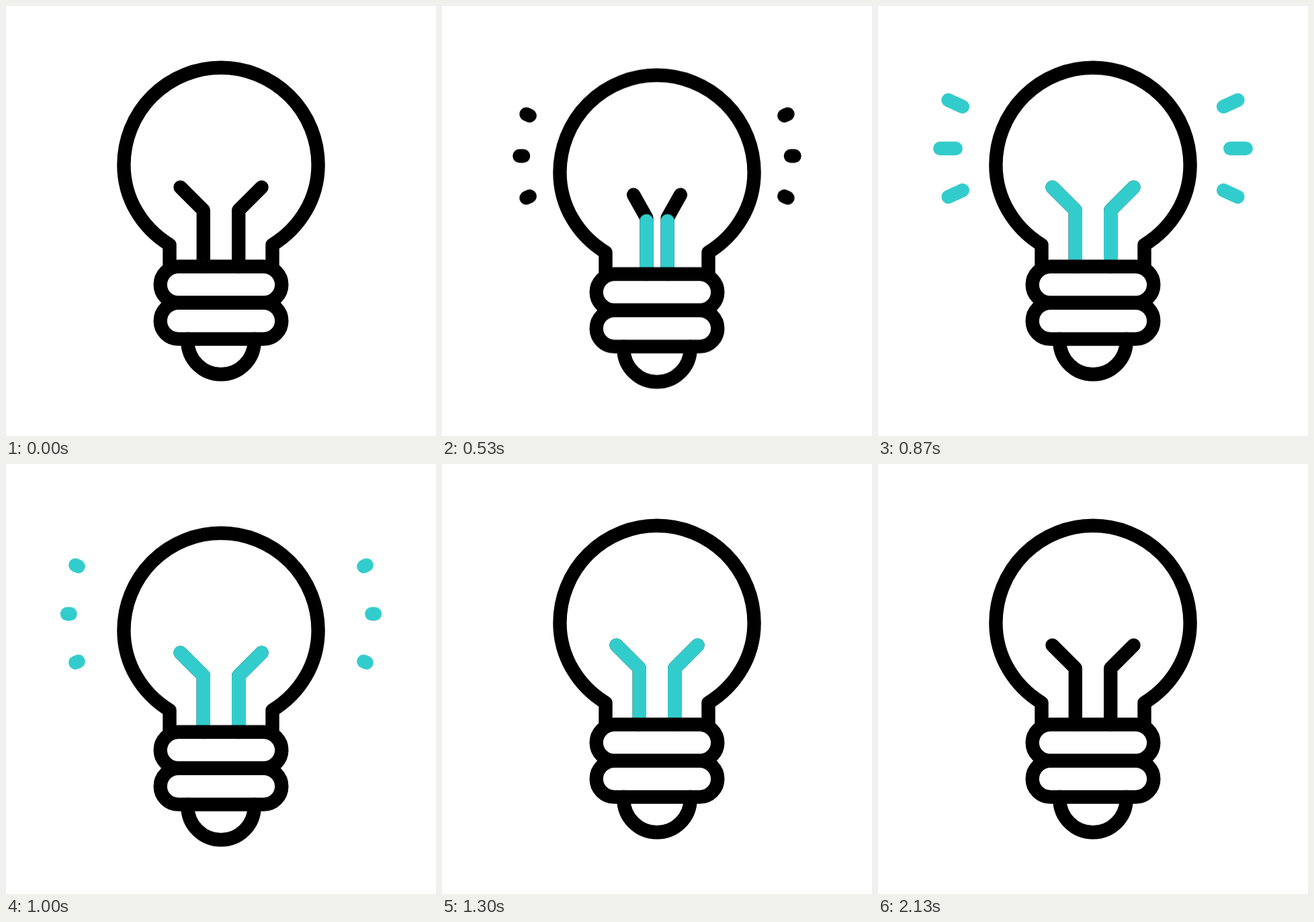
Write an HTML page without scripts that moves like this. It is 640x640 px and loops after 2.5 s.

```html
<!DOCTYPE html>
<html lang="en">
<head>
<meta charset="utf-8">
<title>Light bulb</title>
<style>
  @property --tip { syntax: "<length>"; inherits: true; initial-value: 0px; }
  @property --tail { syntax: "<length>"; inherits: true; initial-value: 0px; }

  :root { --ease: cubic-bezier(.33, 0, .67, 1); }
  html, body { margin: 0; width: 100%; height: 100%; overflow: hidden; background: #fff; }
  svg { display: block; width: 100%; height: 100%; }

  .bulb {
    fill: none;
    stroke: #000;
    stroke-width: 20.4;
    stroke-linecap: round;
    stroke-linejoin: round;
    animation: bounce 2.5s var(--ease) infinite;
  }
  .teal { stroke: #3cc; }

  .wire { animation: pinch 2.5s var(--ease) infinite; }
  .wire.teal {
    stroke-dasharray: 0 2;
    animation: pinch 2.5s var(--ease) infinite, glow 2.5s var(--ease) infinite;
  }

  .rays {
    opacity: 0;
    stroke-dasharray: calc(var(--tip) - var(--tail)) 99px;
    stroke-dashoffset: calc(var(--tail) * -1);
    animation: tip 2.5s var(--ease) infinite, tail 2.5s var(--ease) infinite, show 2.5s step-end infinite;
  }
  .rays.teal { animation-delay: .2s; }

  @keyframes bounce {
    0%, 16% { transform: translateY(0); }
    26.67% { transform: translateY(23px); }
    35% { transform: translateY(0); }
    45.33% { transform: translateY(23px); }
    52%, 100% { transform: translateY(0); }
  }
  @keyframes pinch {
    0%, 13.2%, 34.67%, 100% { d: path("M293.8 388 L293.8 304 L259.5 269.7"); }
    26.67% { d: path("M310.2 388 L310.2 304 L299.3 269.7"); }
  }
  @keyframes glow {
    0%, 13.2% { stroke-dasharray: 0 2; }
    26.67%, 69.33% { stroke-dasharray: 1 2; }
    85.33%, 100% { stroke-dasharray: 0 2; }
  }
  @keyframes tip {
    0%, 18.67% { --tip: 0px; }
    28%, 100% { --tip: 30px; }
  }
  @keyframes tail {
    0%, 24% { --tail: 0px; }
    34.67%, 100% { --tail: 30px; }
  }
  @keyframes show {
    0% { opacity: 0; }
    18.67% { opacity: 1; }
    34.6%, 100% { opacity: 0; }
  }
</style>
</head>
<body>
<svg viewBox="0 0 640 640">
  <defs>
    <g id="side-rays">
      <path d="M130.6 152l-27.2-12.6"/>
      <path d="M121 212h-30"/>
      <path d="M130.6 272l-27.2 12.6"/>
    </g>
  </defs>
  <g class="bulb">
    <g class="rays">
      <use href="#side-rays"/>
      <use href="#side-rays" transform="matrix(-1 0 0 1 640 0)"/>
    </g>
    <g class="rays teal">
      <use href="#side-rays"/>
      <use href="#side-rays" transform="matrix(-1 0 0 1 640 0)"/>
    </g>

    <g>
      <path class="wire" d="M293.8 388L293.8 304L259.5 269.7"/>
      <path class="wire teal" pathLength="1" d="M293.8 388L293.8 304L259.5 269.7"/>
    </g>
    <g transform="matrix(-1 0 0 1 640 0)">
      <path class="wire" d="M293.8 388L293.8 304L259.5 269.7"/>
      <path class="wire teal" pathLength="1" d="M293.8 388L293.8 304L259.5 269.7"/>
    </g>

    <!-- glass, screw base, contact -->
    <path d="M243.5 388V355.5C202 330 175.4 286 175.4 236.4a144.6 144.6 0 0 1 289.2 0C464.6 286 438 330 396.5 355.5V388"/>
    <rect x="229.7" y="387.8" width="180.6" height="53.9" rx="26.95"/>
    <rect x="229.7" y="441.7" width="180.6" height="53.9" rx="26.95"/>
    <path d="M270.4 495.7v3a49.6 49.6 0 0 0 99.2 0v-3"/>
  </g>
</svg>
</body>
</html>
```
